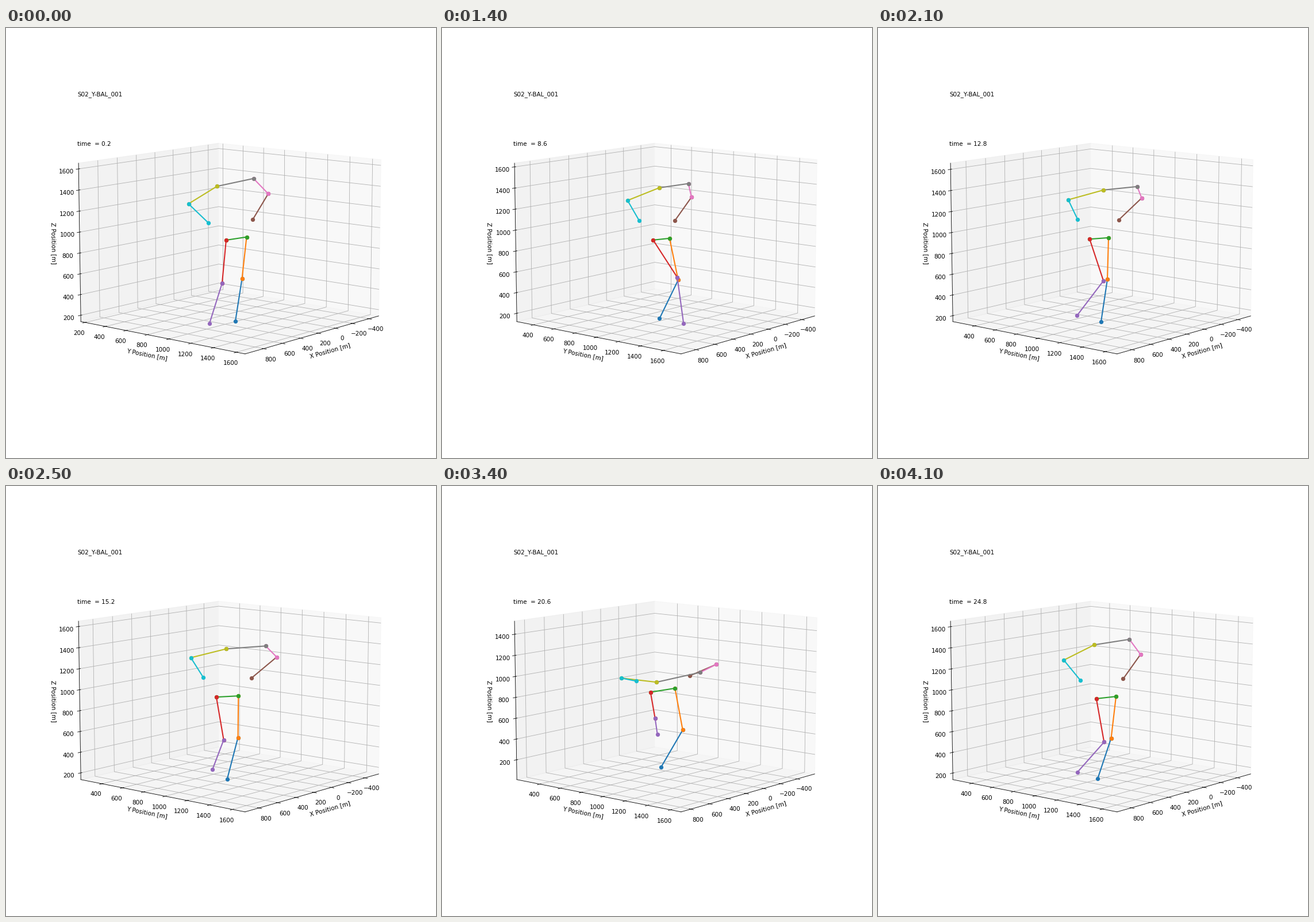
These frames come from a looping animation (748 px wide and 748 px high, 4200 ms). A matplotlib script:

```python
import numpy as np
import matplotlib.pyplot as plt
from matplotlib.animation import FuncAnimation
from matplotlib.ticker import FixedLocator

SIZE = 748
FRAMES = 42
INTERVAL = 100
ELEV, AZIM = 10, 40
TICK_STEP = 200
TICK_REACH = 728          # ticks are shown this far from the body centre
BOX_REACH = 758           # the box itself ends a little further out
MIDDLE = np.array([391.1, 369.95])   # where the box centre appears on stage
PX_FLAT, PX_UP = 0.2445, 0.1807      # pixels per unit, sideways and upwards
THIGH, SHIN, TRUNK = 72.5, 74.5, 98  # pixels

# Motion controls at the key steps: stand still, then one balance reach after another.
STEPS = (8, 14, 21, 29, 34, 41)
CONTROLS = {
    "turn": (31.8, 25.5, 29.3, 39.2, 38, 30.6),    # half width of the shoulders
    "tilt": (6.8, 3.7, 3, 2, 8.5, 4.8),            # rise of the far shoulder
    "chest_x": (-2, 21.5, 37, 27.8, 27.2, 9.8),    # chest from the hips
    "chest_y": (97.7, 93, 87.2, 83.5, 22.5, 96.5),
    "knee": (-8, 15, -2, 0.5, 13.5, -8.5),         # standing leg
    "ankle": (-11.5, -32.5, -11, -26.5, -37.5, -23.5),
    "free_x": (-7, 42, 24, 1.5, 8, 13.5),          # free knee from its hip
    "free_y": (75, 65, 72.5, 76.5, 45.5, 75.5),
    "foot_x": (-22, 11, -46, 7, 4, -46.5),         # free foot from its knee
    "foot_y": (70, 80.5, 60.5, 42.5, 28, 52.5),
    "depth": (769, 790, 756, 750, 708, 770),       # body centre towards the viewer
}


def controls_at(step):
    phase = np.interp(step, STEPS, range(len(STEPS)))
    whole = np.floor(phase)
    p = phase - whole
    eased = whole + p * p * (3 - 2 * p)
    return {k: np.interp(eased, range(len(STEPS)), v) for k, v in CONTROLS.items()}


def pair(x, y, half, rise):
    """Left and right joint around a midpoint."""
    return np.array([x - half, y + rise]), np.array([x + half, y - rise])


def skeleton(c):
    """Leg chain and arm chain around the joints' common mean."""
    turn, tilt, cx, cy = c["turn"], c["tilt"], c["chest_x"], c["chest_y"]
    upright = min(cy / TRUNK, 1)
    lean = np.sqrt(1 - upright ** 2)

    hip_l, hip_r = pair(0, 0, 0.56 * turn, 0.4 * tilt)
    shoulder_l, shoulder_r = pair(cx, -cy, turn, tilt)
    # Hands rest on the waist, so elbows swing up behind the chest as it leans.
    elbow_l, elbow_r = pair(0.67 * cx + 0.8 * turn - 38,
                            -cy + 30 * upright - 18 * lean,
                            2.18 * turn, 1.9 * (tilt - 2.2))
    wrist_l, wrist_r = pair(0.25 * cx + 0.5 * turn - 25.5,
                            -29.5 * upright - 14 * lean,
                            1.22 * turn, 0.9 * (tilt - 3.5))

    knee_r = hip_r + (c["knee"], THIGH)
    ankle_r = knee_r + (c["ankle"], np.sqrt(SHIN ** 2 - c["ankle"] ** 2))
    knee_l = hip_l + (c["free_x"], c["free_y"])
    ankle_l = knee_l + (c["foot_x"], c["foot_y"])

    legs = np.array([ankle_r, knee_r, hip_r, hip_l, knee_l, ankle_l])
    arms = np.array([wrist_r, elbow_r, shoulder_r, shoulder_l, elbow_l, wrist_l])
    mean = (legs.mean(axis=0) + arms.mean(axis=0)) / 2
    return legs - mean, arms - mean


def body_centre(ankle, depth):
    """Plot position of the body centre, with the standing foot planted."""
    side = 582 - ankle[0] / PX_FLAT
    sink = np.sin(np.radians(ELEV)) * PX_FLAT
    height = (ankle[1] - 10.4 + sink * depth) / PX_UP
    sin, cos = np.sin(np.radians(AZIM)), np.cos(np.radians(AZIM))
    return cos * depth - sin * side, sin * depth + cos * side, height


fig = plt.figure(figsize=(10, 10), dpi=SIZE / 10)
ax = fig.add_subplot(projection="3d")
ax.view_init(elev=ELEV, azim=AZIM)
ax.set_xlabel("X Position [m]")
ax.set_ylabel("Y Position [m]")
ax.set_zlabel("Z Position [m]")
ax.text2D(0.05, 0.95, "S02_Y-BAL_001", transform=ax.transAxes)
clock = ax.text2D(0.05, 0.8, "", transform=ax.transAxes)

stage = fig.add_axes([0, 0, 1, 1])
stage.set_xlim(0, SIZE)
stage.set_ylim(SIZE, 0)
stage.axis("off")
bones = [stage.plot([], [], "o-", color=f"C{n}", lw=2)[0] for n in range(10)]


def set_range(axis, set_lim, mid):
    first = np.ceil((mid - TICK_REACH) / TICK_STEP) * TICK_STEP
    axis.set_major_locator(FixedLocator(np.arange(first, mid + TICK_REACH, TICK_STEP)))
    set_lim(mid - BOX_REACH, mid + BOX_REACH)


def update(step):
    controls = controls_at(step)
    legs, arms = skeleton(controls)
    x, y, z = body_centre(legs[0], controls["depth"])
    set_range(ax.xaxis, ax.set_xlim, x)
    set_range(ax.yaxis, ax.set_ylim, y)
    set_range(ax.zaxis, ax.set_zlim, z)
    clock.set_text(f"time  = {0.2 + 0.6 * step:.1f}")

    legs, arms = legs + MIDDLE, arms + MIDDLE
    links = [chain[n:n + 2] for chain in (legs, arms) for n in range(5)]
    for bone, link in zip(bones, links):
        bone.set_data(link[:, 0], link[:, 1])
    return [clock, *bones]


anim = FuncAnimation(fig, update, frames=FRAMES, interval=INTERVAL,
                     repeat=True, repeat_delay=0, blit=False)
plt.show()
```
